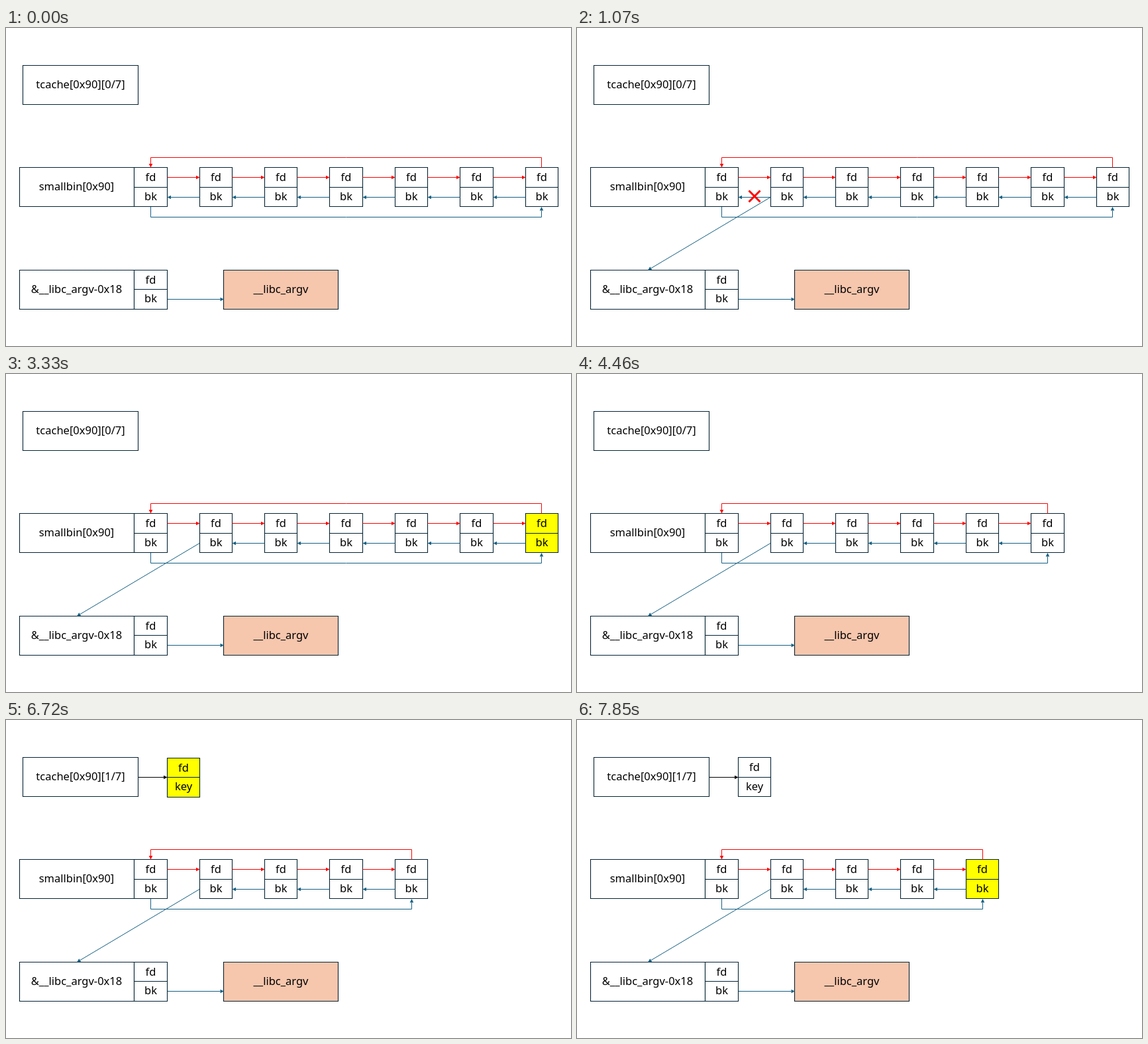
An HTML page with a canvas that plays this animation: 853x480 px, repeating every 8000 ms.

```html
<!DOCTYPE html>
<html lang="en">
<head>
<meta charset="utf-8">
<title>Heap bins</title>
<style>
  html, body { margin: 0; width: 100%; height: 100%; overflow: hidden; background: #fff; }
  canvas { display: block; }
</style>
</head>
<body>
<canvas id="stage" width="853" height="480"></canvas>
<script>
const ctx = document.getElementById('stage').getContext('2d');
const LOOP = 8000;
const STEPS = [1070, 2200, 3330, 4460, 5590, 6720, 7850];
const INK = '#042433', RED = '#ff0000', BLUE = '#156082', YELLOW = '#ffff00', PEACH = '#f6c6ad';

function label(text, x, baseline) {
  ctx.fillStyle = '#000';
  ctx.fillText(text, x, baseline);
}

function box(left, top, right, bottom, fill = '#fff') {
  ctx.fillStyle = fill;
  ctx.strokeStyle = INK;
  ctx.lineWidth = 1.1;
  ctx.beginPath();
  ctx.rect(left, top, right - left, bottom - top);
  ctx.fill();
  ctx.stroke();
}

// Two stacked cells holding a pair of pointers
function pair(left, top, right, fill, lower = 'bk', split = top + 30) {
  const middle = (left + right) / 2;
  box(left, top, right, split, fill);
  box(left, split, right, top + 59, fill);
  label('fd', middle, top + 20.5);
  label(lower, middle, split + 19.5);
}

// Polyline ending in a filled triangular head
function arrow(color, ...points) {
  const [tipX, tipY] = points.at(-1), [fromX, fromY] = points.at(-2);
  const angle = Math.atan2(tipY - fromY, tipX - fromX);
  const baseX = tipX - 5.5 * Math.cos(angle), baseY = tipY - 5.5 * Math.sin(angle);
  const sideX = 2.8 * Math.sin(angle), sideY = 2.8 * Math.cos(angle);
  ctx.strokeStyle = ctx.fillStyle = color;
  ctx.lineWidth = 1;
  ctx.beginPath();
  for (const [x, y] of points.slice(0, -1)) ctx.lineTo(x, y);
  ctx.lineTo(baseX, baseY);
  ctx.stroke();
  ctx.beginPath();
  ctx.moveTo(tipX, tipY);
  ctx.lineTo(baseX + sideX, baseY - sideY);
  ctx.lineTo(baseX - sideX, baseY + sideY);
  ctx.fill();
}

function cross(x, y, reach) {
  ctx.strokeStyle = RED;
  ctx.lineWidth = 3;
  ctx.beginPath();
  for (const side of [-1, 1]) {
    ctx.moveTo(x - reach * side, y - reach);
    ctx.lineTo(x + reach * side, y + reach);
  }
  ctx.stroke();
}

const pixel = value => Math.floor(value) + 0.5;
const nodeLeft = index => pixel(292.1 + 98.4 * index);
const nodeRight = index => pixel(341.5 + 98.4 * index);

function drawTcache(step) {
  const moved = step >= 6;
  box(25.5, 56.5, 199.5, 115.5);
  label(`tcache[0x90][${moved ? 1 : 0}/7]`, 112.5, 91);
  if (!moved) return;
  const fresh = step === 6;
  pair(243.5, fresh ? 57.5 : 56.5, 292.5, fresh ? YELLOW : '#fff', 'key', 86.5);
  arrow('#000', [200, 86.5], [243.5, 86.5]);
}

function drawSmallbin(step) {
  const count = step < 4 ? 6 : step < 6 ? 5 : 4;
  const picked = step === 3 || step === 5 || step === 7;
  const end = pixel(316.8 + 98.4 * (count - 1));

  box(20.5, 210.5, 193.5, 269.5);
  label('smallbin[0x90]', 106.5, 245);
  pair(193.5, 210.5, 243.5);

  for (let i = 0; i < count; i++) {
    const previous = i ? nodeRight(i - 1) : 243.5, left = nodeLeft(i);
    pair(left, 210.5, nodeRight(i), picked && i === count - 1 ? YELLOW : '#fff');
    arrow(RED, [previous, 225.5], [left, 225.5]);
    if (i || step < 2) arrow(BLUE, [left, 255.5], [previous, 255.5]);
  }
  arrow(RED, [end, 210.5], [end, 195.5], [218.5, 195.5], [218.5, 210.5]);
  arrow(BLUE, [218.5, 270], [218.5, 285.5], [end, 285.5], [end, 270]);
}

function drawArgv(step) {
  box(20.5, 365.5, 193.5, 424.5);
  label('&__libc_argv-0x18', 106.5, 400);
  pair(193.5, 365.5, 243.5, '#fff', 'bk', 394.5);
  box(328.5, 365.5, 501.5, 424.5, PEACH);
  label('__libc_argv', 415, 400);
  arrow(BLUE, [244, 409.5], [329, 409.5]);
  if (step >= 1) arrow(BLUE, [292, 255.5], [107, 365.5]);
  if (step === 1) cross(268, 254, 8.5);
}

function draw(now) {
  const time = now % LOOP;
  const step = STEPS.filter(start => time >= start).length;
  ctx.fillStyle = '#fff';
  ctx.fillRect(0, 0, 853, 480);
  ctx.font = '16.5px "Noto Sans", sans-serif';
  ctx.textAlign = 'center';
  drawTcache(step);
  drawSmallbin(step);
  drawArgv(step);
  requestAnimationFrame(draw);
}
draw(0);
</script>
</body>
</html>
```
